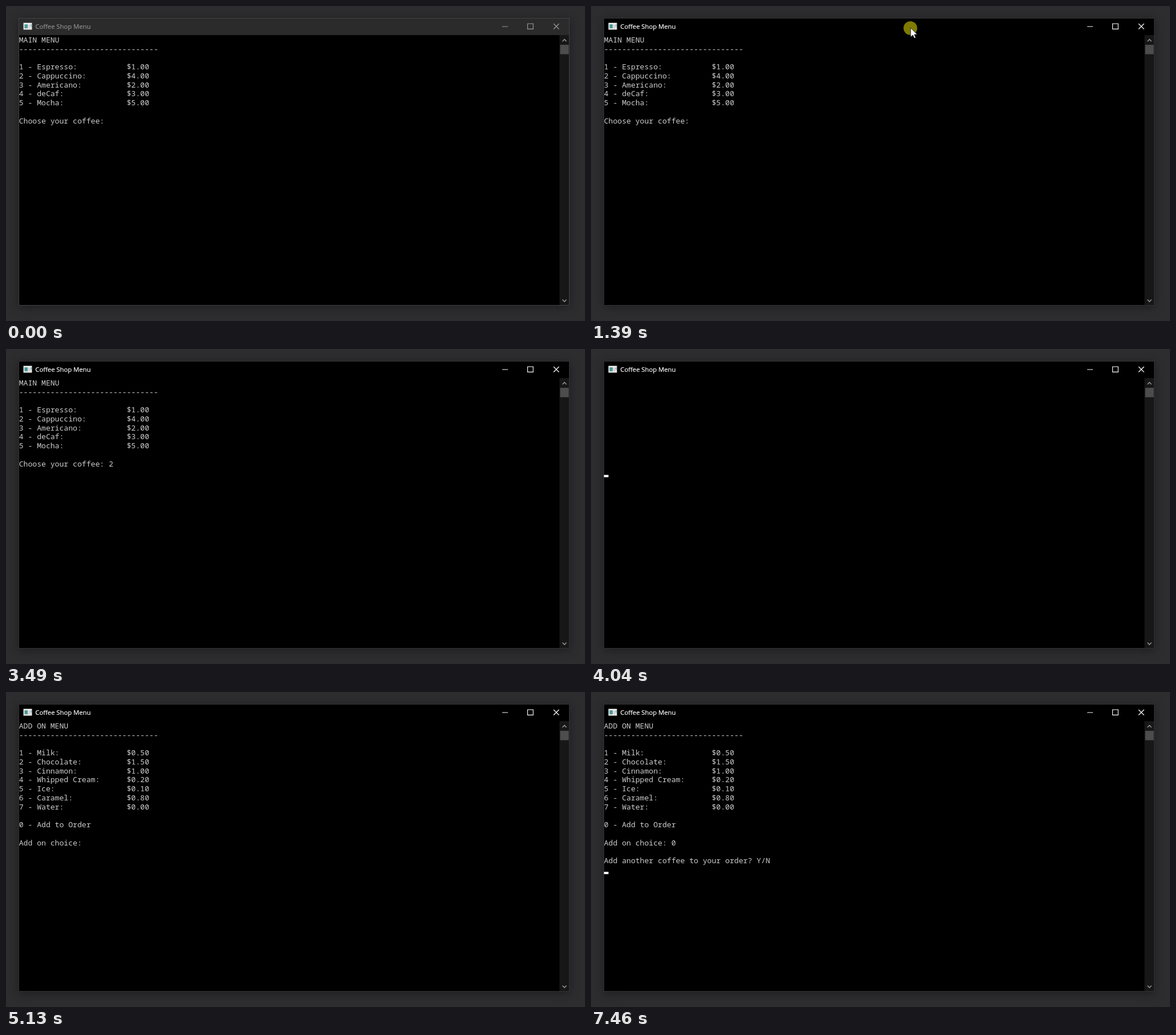
An HTML page for the animation above (8000 ms loop, 1014x552 px).

```html
<!DOCTYPE html>
<html lang="en">
<head>
<meta charset="utf-8">
<title>Coffee Shop Menu</title>
<style>
  html, body { margin: 0; width: 100%; height: 100%; overflow: hidden; background: #2d2d30; }
  #window { position: absolute; left: 22px; top: 21px; width: 965px; height: 504px;
            box-shadow: 0 3px 16px rgba(0, 0, 0, .36); }
  svg { position: absolute; left: 0; top: 0; display: block; }
  #console text { font: 13.125px "Noto Sans Mono", "DejaVu Sans Mono", monospace; fill: #ccc;
                  white-space: pre; font-variant-ligatures: none; }
  #title { font: 11.25px "Open Sans", "Noto Sans", sans-serif; stroke-width: .2; }
</style>
</head>
<body>
<div id="window"></div>
<svg width="1014" height="552" viewBox="0 0 1014 552">
  <rect x="23" y="22" width="963" height="502"/>
  <rect id="bar" x="23" y="22" width="963" height="29"/>

  <g id="icon">
    <rect x="30.5" y="29.5" width="15" height="12" fill="#e2e2e2"/>
    <rect x="31.5" y="30.5" width="13" height="1.5" fill="#fff"/>
    <rect x="32.5" y="32" width="5.5" height="7" fill="#4b9a98"/>
    <rect x="39" y="32" width="3" height="7" fill="#d9d3d3"/>
    <rect x="43" y="32" width="1.5" height="4" fill="#7fb3c4"/>
  </g>
  <text id="title" x="51.3" y="40">Coffee Shop Menu</text>
  <path id="buttons" fill="none" stroke-width="1.15"
        d="M869 36H879M913.5 31H923.2V40.4H913.5ZM959 31L968.5 40.5M968.5 31L959 40.5"/>

  <rect x="969.3" y="51" width="16.7" height="473" fill="#171717"/>
  <rect x="970.5" y="68" width="15" height="16.5" fill="#4d4d4d"/>
  <path d="M974.5 62L978 58.5L981.5 62M974.5 514.5L978 518L981.5 514.5"
        fill="none" stroke="#8c8c8c" stroke-width="1.7"/>

  <g id="console"></g>
  <rect id="caret" width="7.9" height="4" fill="#fff"/>

  <circle id="click" cx="559.3" cy="38.8" r="12" fill="#7f7a00"/>
  <path id="pointer" d="M0 0V16.2L3.8 12.7L6.3 18.3L8.9 17.2L6.4 11.7H11.6Z"
        fill="#fff" stroke="#000" stroke-width=".8"/>
</svg>
<script>
const LOOP = 8000, CELL_W = 7.875, CELL_H = 15.75, LEFT = 22.7, TOP = 51;
const $ = id => document.getElementById(id);

const menu = (title, items) => [
  title, "-".repeat(31), "",
  ...items.map(([name, price], i) => `${i + 1} - ${(name + ":").padEnd(20)}$${price.toFixed(2)}`), ""
];
const coffees = menu("MAIN MENU", [
  ["Espresso", 1], ["Cappuccino", 4], ["Americano", 2], ["deCaf", 3], ["Mocha", 5]
]);
const addOns = [...menu("ADD ON MENU", [
  ["Milk", .5], ["Chocolate", 1.5], ["Cinnamon", 1], ["Whipped Cream", .2],
  ["Ice", .1], ["Caramel", .8], ["Water", 0]
]), "0 - Add to Order", ""];

const pages = {
  coffee: [...coffees, "Choose your coffee: "],
  coffeeChosen: [...coffees, "Choose your coffee: 2"],
  empty: [],
  addOn: [...addOns, "Add on choice: "],
  addOnChosen: [...addOns, "Add on choice: 0"],
  another: [...addOns, "Add on choice: 0", "", "Add another coffee to your order? Y/N"]
};

// time, page, caret [column, row]
const screens = [
  [0, "coffee"],
  [1930, "coffee", [20, 9]],
  [2410, "coffee"],
  [3020, "coffee", [20, 9]],
  [3490, "coffeeChosen"],
  [4040, "empty", [0, 10]],
  [4120, "addOn", [15, 13]],
  [5130, "addOn"],
  [5590, "addOnChosen"],
  [6150, "addOnChosen", [16, 13]],
  [6680, "addOnChosen"],
  [7240, "addOnChosen", [16, 13]],
  [7460, "another", [0, 16]]
];

// time, pointer tip
const moves = [
  [0], [1060, 557.6, 14.5], [1140, 558.5, 29], [1220, 559.8, 38.3], [1680]
];

const at = (steps, t) => steps.findLast(step => step[0] <= t);
const show = (el, on) => el.setAttribute("visibility", on ? "visible" : "hidden");

let page;
function setPage(name) {
  if (name === page) return;
  page = name;
  $("console").replaceChildren(...pages[name].map((line, row) => {
    const text = document.createElementNS("http://www.w3.org/2000/svg", "text");
    text.setAttribute("x", LEFT);
    text.setAttribute("y", Math.round(TOP + 12.8 + row * CELL_H));
    text.textContent = line;
    return text;
  }));
}

function render(t) {
  const active = t >= 1390;
  const ink = active ? "#fff" : "#8e8e8e";
  $("window").style.background = active ? "#323232" : "#424242";
  $("bar").setAttribute("fill", active ? "#000" : "#2b2b2b");
  $("title").setAttribute("fill", ink);
  $("title").setAttribute("stroke", ink);
  $("buttons").setAttribute("stroke", active ? "#fff" : "#9a9a9a");

  const [, name, caret] = at(screens, t);
  setPage(name);
  show($("caret"), caret);
  if (caret) {
    $("caret").setAttribute("x", LEFT + caret[0] * CELL_W);
    $("caret").setAttribute("y", TOP + (caret[1] + 1) * CELL_H - 3.6);
  }

  const [, x, y] = at(moves, t);
  show($("pointer"), x);
  if (x) $("pointer").setAttribute("transform", `translate(${x} ${y})`);
  show($("click"), t >= 1390 && t < 1530);
}

const start = performance.now();
function tick() {
  render((performance.now() - start) % LOOP);
  requestAnimationFrame(tick);
}
tick();
</script>
</body>
</html>
```
